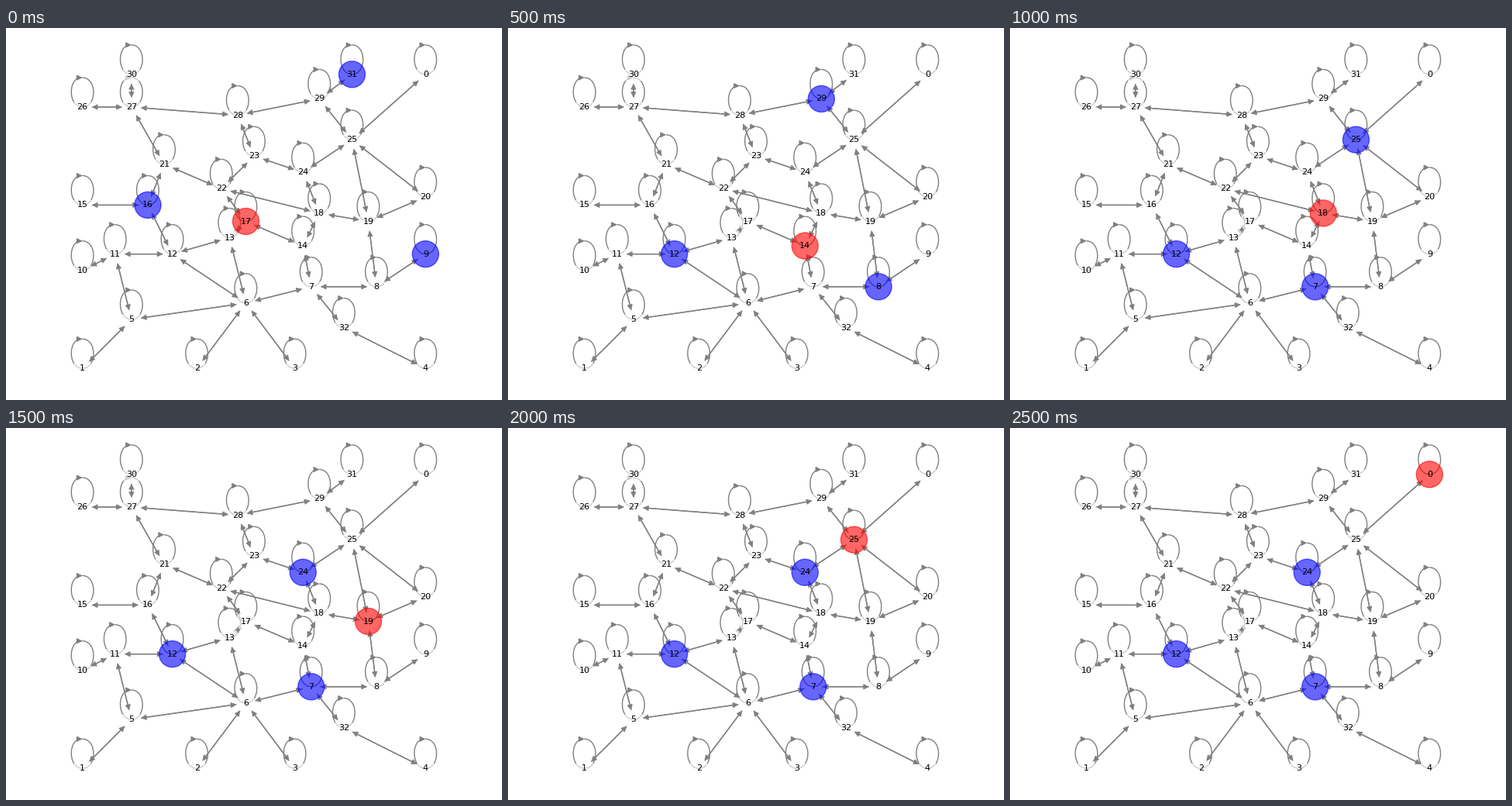
A matplotlib script that plays this animation: 640 by 480 pixels, repeating every 3000 ms.

```python
from itertools import pairwise

import matplotlib.pyplot as plt
from matplotlib.animation import FuncAnimation
from matplotlib.patches import FancyArrowPatch
from matplotlib.path import Path

WIDTH, HEIGHT, DPI = 640, 480, 100
ROWS, COLS = 36, 42
SMALL, BIG = 300, 600               # marker areas of empty and occupied nodes
EDGE_GAP = SMALL ** 0.5 / 2

LOOP = 0.1 * ROWS                   # height of the self loops
TOP = LOOP + 2.8 / HEIGHT           # room above the upper row, with the head
BOTTOM = 0.05 * ROWS                # room below the lower row
SPAN = 1.1 * (ROWS + TOP + BOTTOM)
UNIT = HEIGHT / SPAN                # pixels per grid step

# Nodes in index order: a row counted from the top, then its columns
LAYOUT = [
    (0, 42), (36, 0, 14, 26, 42), (30, 6), (28, 20), (26, 28, 36), (22, 42),
    (24, 0), (22, 4, 11), (20, 18), (21, 27), (16, 0, 8), (18, 20), (17, 29),
    (18, 35), (15, 42), (11, 10), (14, 17), (10, 21), (12, 27), (8, 33),
    (4, 0, 6), (5, 19), (3, 29), (0, 6, 33), (31, 32),
]
POS = [(col, ROWS - row) for row, *cols in LAYOUT for col in cols]

# Streets through the graph; neighbours on a street are linked
STREETS = [
    (26, 27, 28, 29, 31), (15, 16, 21, 22, 23, 28), (30, 27, 21),
    (23, 24, 25, 0), (16, 12, 13, 17, 14, 7, 32, 4), (10, 11, 5, 1),
    (11, 12, 6, 7, 8, 9), (5, 6, 2), (3, 6, 13), (29, 25, 19, 8),
    (25, 20, 19, 18, 14), (24, 18, 22, 17),
]

# Each piece walks one node per step and waits at the end of its route
ROUTES = [
    ("blue", (31, 29, 25, 24)), ("blue", (16, 12)), ("blue", (9, 8, 7)),
    ("red", (17, 14, 18, 19, 25, 0)),
]
STEPS = max(len(route) for _, route in ROUTES)

fig = plt.figure(figsize=(WIDTH / DPI, HEIGHT / DPI), dpi=DPI, facecolor="white")
ax = fig.add_axes([0, 0, 1, 1])
ax.axis("off")
half = WIDTH / 2 / UNIT
base = -BOTTOM - SPAN / 22
ax.set_xlim(COLS / 2 - half, COLS / 2 + half)
ax.set_ylim(base, base + SPAN)


def add_arrow(**where):
    ax.add_patch(FancyArrowPatch(
        arrowstyle="-|>", mutation_scale=10, color="gray", linewidth=1,
        shrinkA=EDGE_GAP, shrinkB=EDGE_GAP, zorder=1, **where))


def loop_path(x, y):
    """Closed oval from the point above a node, through the node and back."""
    w, h = LOOP / 2, LOOP
    steps = [(0, h), (w, h), (w, 0), (0, 0), (-w, 0), (-w, h), (0, h)]
    return Path([(x + dx, y + dy) for dx, dy in steps],
                [Path.MOVETO] + [Path.CURVE4] * 6)


for street in STREETS:
    for a, b in pairwise(street):
        add_arrow(posA=POS[a], posB=POS[b])
        add_arrow(posA=POS[b], posB=POS[a])

for i, (x, y) in enumerate(POS):
    add_arrow(path=loop_path(x, y))
    ax.text(x, y, str(i), size=8, family="DejaVu Sans", color="black",
            ha="center", va="center", zorder=3)

dots = ax.scatter(*zip(*POS), s=SMALL, c=["white"] * len(POS),
                  alpha=0.6, zorder=2)


def update(step):
    colors = ["white"] * len(POS)
    sizes = [SMALL] * len(POS)
    for color, route in ROUTES:
        node = route[min(step, len(route) - 1)]
        colors[node] = color
        sizes[node] = BIG
    dots.set_color(colors)
    dots.set_sizes(sizes)
    return [dots]


anim = FuncAnimation(fig, update, frames=STEPS, interval=500,
                     repeat=True, repeat_delay=0, blit=False)
plt.show()
```
